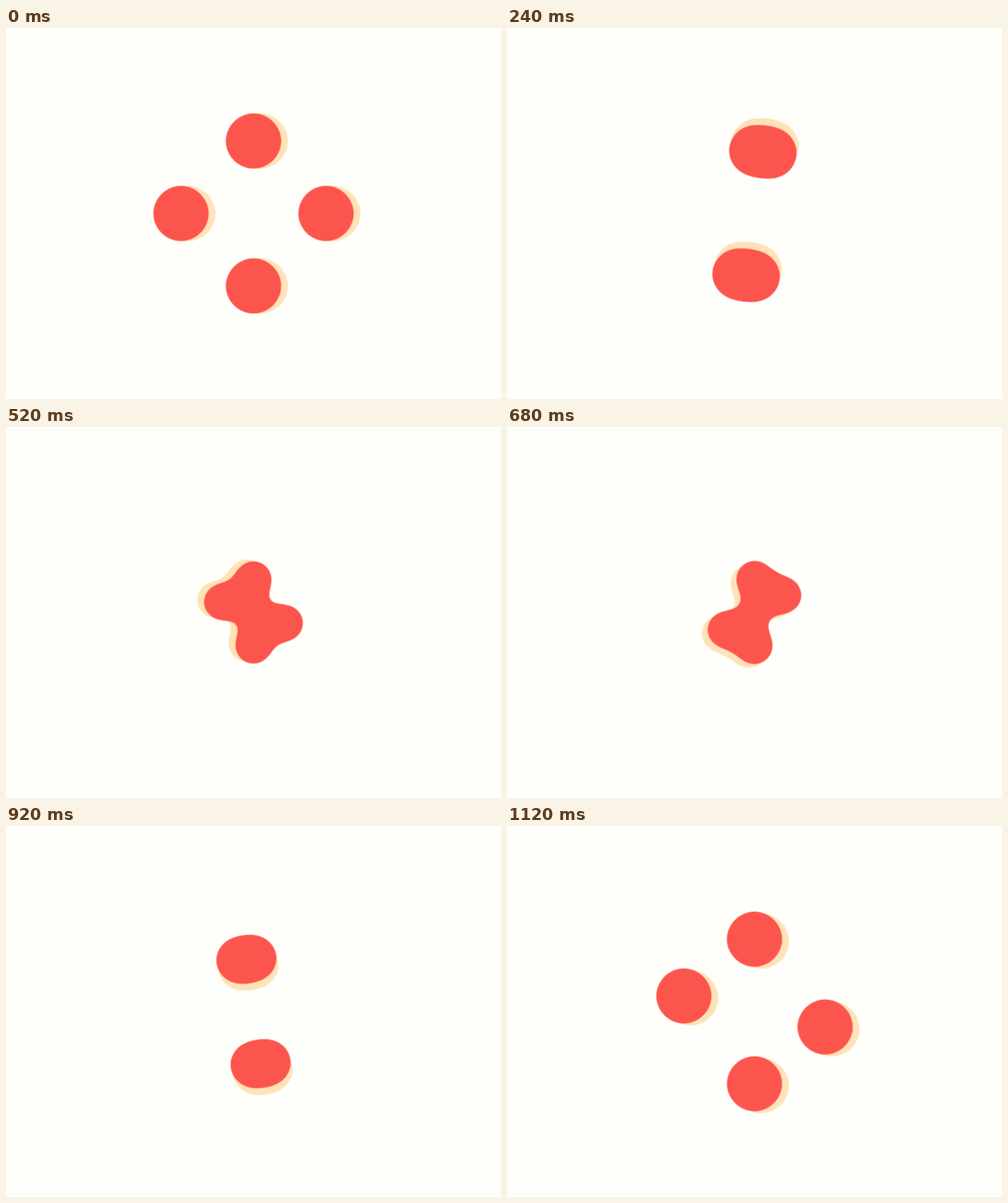
An HTML page that plays this animation: 512 px wide and 384 px high, repeating every 1.16 s.

```html
<!DOCTYPE html>
<html lang="en">
<head>
<meta charset="utf-8">
<title>Gooey loader</title>
<style>
  html, body { margin: 0; width: 100%; height: 100%; overflow: hidden; background: #fefefb; }
  svg { display: block; width: 512px; height: 384px; }
</style>
</head>
<body>
<svg viewBox="0 0 512 384">
  <defs>
    <filter id="goo" filterUnits="userSpaceOnUse" x="-256" y="-192" width="512" height="384"
            color-interpolation-filters="sRGB">
      <feGaussianBlur in="SourceGraphic" stdDeviation="10"/>
      <feColorMatrix values="1 0 0 0 0  0 1 0 0 0  0 0 1 0 0  0 0 0 18 -7" result="blob"/>
      <feOffset id="shift" in="blob" dx="7.2" dy="0" result="moved"/>
      <feFlood flood-color="#ffe2b8"/>
      <feComposite in2="moved" operator="in" result="shadow"/>
      <feFlood flood-color="#fc554d"/>
      <feComposite in2="blob" operator="in" result="body"/>
      <feMerge>
        <feMergeNode in="shadow"/>
        <feMergeNode in="body"/>
      </feMerge>
    </filter>
  </defs>
  <g transform="translate(256 192)">
    <g id="balls" filter="url(#goo)"></g>
  </g>
</svg>
<script>
const LOOP = 1160, STEP = 40, FAR = 75, NEAR = 34, SHADOW = 7;
const stage = document.getElementById('balls');
const shift = document.getElementById('shift');

function set(el, attrs) {
  for (const key in attrs) el.setAttribute(key, attrs[key]);
}

function add(tag) {
  const el = document.createElementNS('http://www.w3.org/2000/svg', tag);
  stage.appendChild(el);
  return el;
}

// Timing curve with control points (x1, 0) and (x2, 1)
function ease(x1, x2) {
  return x => {
    let lo = 0, hi = 1, s = 0.5;
    for (let i = 0; i < 24; i++) {
      s = (lo + hi) / 2;
      const v = 1 - s;
      if (3 * x1 * s * v * v + 3 * x2 * s * s * v + s * s * s < x) lo = s;
      else hi = s;
    }
    return s * s * (3 - 2 * s);
  };
}

const gather = ease(0.69, 0.355);
const scatter = ease(0.82, 0.4);

function reach(p) {
  const closed = p < 0.5 ? gather(p * 2) : 1 - scatter(p * 2 - 1);
  return FAR - (FAR - NEAR) * closed;
}

// Two opposite balls and the strand that joins them when close
function makePair() {
  const strand = add('line'), a = add('circle'), b = add('circle');
  return (angle, dist, radius, half) => {
    const x = dist * Math.cos(angle), y = dist * Math.sin(angle);
    set(a, { cx: x, cy: y, r: radius });
    set(b, { cx: -x, cy: -y, r: radius });
    set(strand, { x1: x, y1: y, x2: -x, y2: -y, 'stroke-width': half * 2,
                  stroke: half > 0 ? '#000' : 'none' });
  };
}

const fixed = makePair(), spinning = makePair();

function draw(ms) {
  const p = (Math.floor(ms / STEP) * STEP % LOOP) / LOOP;
  const turn = -2 * Math.PI * p;
  const dist = reach(p);
  const radius = 28.2 - 0.225 * (FAR - dist);
  const half = Math.max(0, 8 - 0.75 * (dist - 35));
  fixed(Math.PI / 2, dist, radius, half);
  spinning(turn, dist, radius, half);
  set(shift, { dx: SHADOW * Math.cos(turn), dy: SHADOW * Math.sin(turn) });
}

const start = performance.now();
function tick() {
  draw(performance.now() - start);
  requestAnimationFrame(tick);
}
tick();
</script>
</body>
</html>
```
